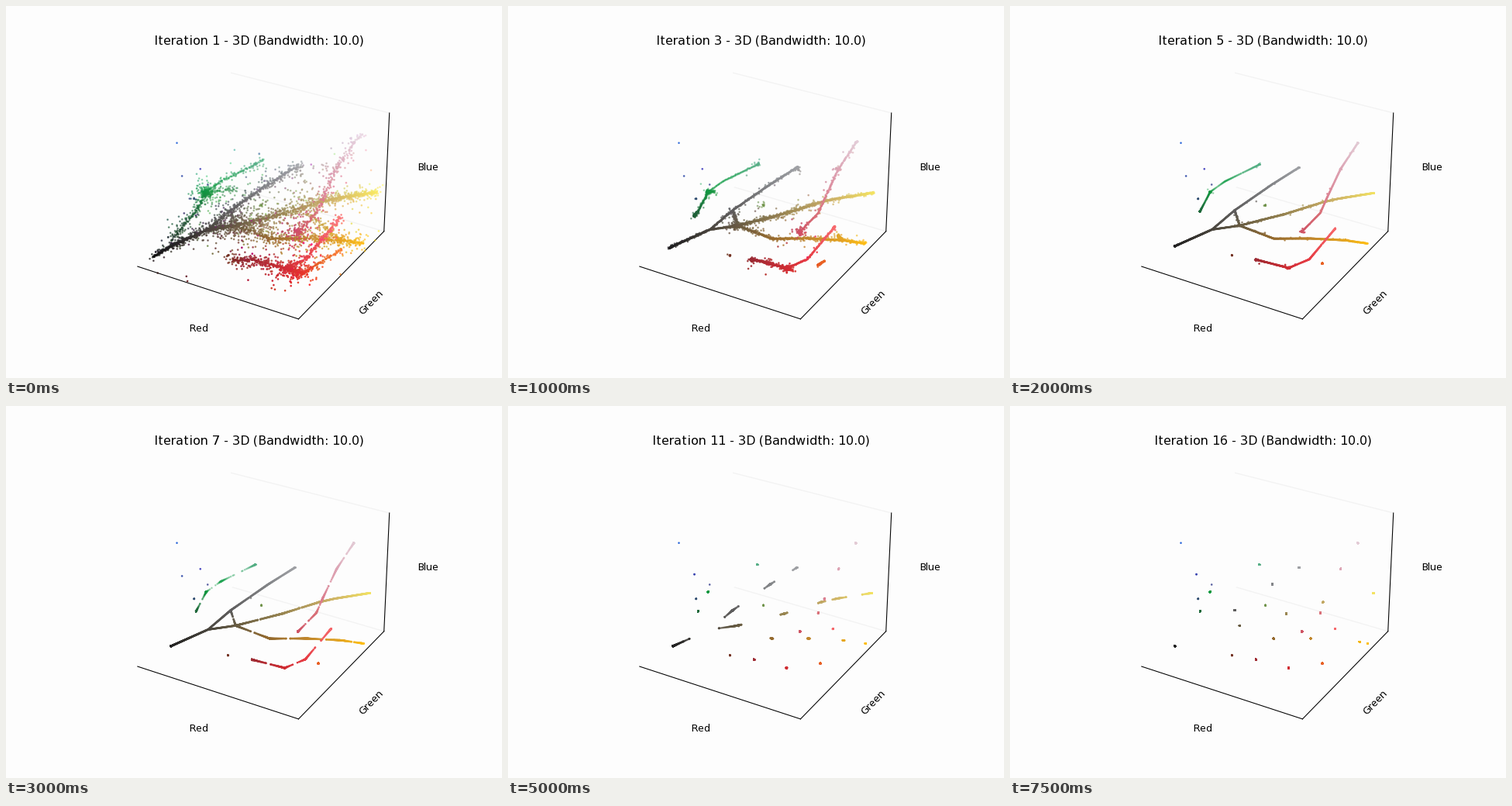
Animation, 640 px wide and 480 px high, one loop 8 s. Source, as a matplotlib script:

```python
import numpy as np
import matplotlib.pyplot as plt
from matplotlib.animation import FuncAnimation
from matplotlib.colors import to_rgb

STEPS = 16

# Strands of colour in RGB space: count, spread, step at which clumping starts,
# and the colours passed through. Starred colours are the density peaks.
STRANDS = [
    (450, 2, 6.5, '101010 *222222 49453d *685c42'),
    (650, 3, 5.7, '*222222 49453d *5f5e5e *848689 *9fa1a5 a6a6a6'),
    (110, 10, 4.0, '*5f5e5e *685c42'),
    (800, 9, 5.0, '49453d *685c42 *9a8752 *c2a864'),
    (450, 4, 6.5, '*c2a864 *d2b867 *f3e363 f9ed60'),
    (700, 7, 4.3, '*685c42 *966b2e *c1872c *e7a820 *febf12'),
    (110, 8, 3.0, 'b89954 *e7a820'),
    (220, 4, 3.5, '17331d *1f693b *129940'),
    (260, 6, 3.0, '*129940'),
    (130, 2, 3.5, '*129940 *23a655 *57b087 5dbd8c'),
    (80, 5, 4.0, '*129940 48945e'),
    (25, 9, 2.0, '*57b087'),
    (20, 8, 3.0, '*71944b'),
    (18, 7, 4.0, '*9fa1a5 b1a386'),
    (20, 6, 4.0, 'c2adb0 *dda6b6'),
    (240, 4, 4.0, 'ebd9e5 *e3ccd6 *dda6b6 *dc8090 *da737b *cf5465'),
    (130, 12, 3.0, '*cf5465'),
    (12, 4, 2.0, '*743324'),
    (330, 4, 4.0, '7f2a24 *9f2b33 *d02e34 e7382b'),
    (250, 5, 3.0, '*d02e34 e7382b'),
    (70, 18, 2.0, '*9f2b33 *d02e34'),
    (200, 2, 3.5, '*d02e34 *e73d45 *f6696c fc7a7d'),
    (110, 2, 3.5, 'e7382b *e86122 fc8032'),
    (6, 2, 2.0, '*2f4c70'),
    (1, 0, 2.0, '*1054d5'),
    (1, 0, 2.0, '*454d96'),
    (1, 0, 2.0, '*2440a4'),
    (1, 0, 2.0, '*4240be'),
]

# Weak peaks that are absorbed by a stronger one, and from which step
MERGES = {
    '2440a4': ('3540ae', 7), '4240be': ('3540ae', 7),
    '23a655': ('129940', 9), 'e73d45': ('d02e34', 9),
    'dc8090': ('da737b', 11), 'd2b867': ('c2a864', 13),
    'e7a820': ('f5b817', 13),
}

rng = np.random.default_rng(7)


def rgb(name):
    return 255 * np.array(to_rgb('#' + name))


def strand(n, spread, delay, path):
    """Return a function giving the strand's RGB positions at step k."""
    words = path.split()
    nodes = np.array([rgb(w.strip('*')) for w in words])
    s = np.r_[0, np.cumsum(np.linalg.norm(np.diff(nodes, axis=0), axis=1))]
    s /= max(s[-1], 1e-9)
    names = [w[1:] for w in words if w[0] == '*']
    peaks = np.array([t for t, w in zip(s, words) if w[0] == '*'])

    u = np.linspace(0, 1, n)
    near = abs(u[:, None] - peaks).argmin(axis=1)
    home = peaks[near]
    edge = np.r_[-np.inf, peaks, np.inf]
    half = np.where(u > home, edge[near + 2] - home, home - edge[near]) / 2
    d = np.clip(abs(u - home) / half, 0, .97)
    noise = rng.normal(0, spread, (n, 3)) * rng.exponential(1, (n, 1))
    pace = 1.3 - rng.random((n, 1)) ** 4  # a few stragglers

    def at(k):
        thin = np.exp(-.6 * (k - 1) ** 1.5)
        g = np.exp(-(.5 * max(0, k - delay)) ** 1.5)
        # Tails shrink quickly; between two peaks the strand parts slowly
        f = np.where(np.isinf(half), thin, g / (1 - d + d * g))
        v = home + (u - home) * f
        pos = np.column_stack([np.interp(v, s, c) for c in nodes.T])
        pos += noise * thin ** pace
        for i, name in enumerate(names):
            if name in MERGES:
                into, start = MERGES[name]
                w = np.clip((k - start) / 2, 0, 1)
                pos[near == i] += w * (rgb(into) - rgb(name))
        return np.clip(pos, 0, 255)

    return at


strands = [strand(*spec) for spec in STRANDS]

plt.rcParams['font.family'] = 'DejaVu Sans'
plt.rcParams['text.hinting_factor'] = 1
fig = plt.figure(figsize=(640 / 96, 480 / 96), dpi=96, facecolor='#fdfdfd')
fig.subplots_adjust(left=.123, right=.898)
ax = fig.add_subplot(projection='3d', facecolor='none')
ax.set(xlim=(0, 255), ylim=(0, 255), zlim=(0, 255),
       xticks=[], yticks=[], zticks=[],
       xlabel='Red', ylabel='Green', zlabel='Blue')
ax.xaxis.pane.set_visible(False)
ax.zaxis.pane.set_visible(False)
ax.yaxis.pane.fill = False
ax.yaxis.pane.set_edgecolor('#e9e9e9')


def draw(i):
    for old in list(ax.collections):
        old.remove()
    pos = np.vstack([at(i + 1) for at in strands])
    ax.scatter(*pos.T, c=pos / 255, s=1)
    ax.set_title(f'Iteration {i + 1} - 3D (Bandwidth: 10.0)')


anim = FuncAnimation(fig, draw, frames=STEPS, interval=500, repeat=True)
plt.show()
```
